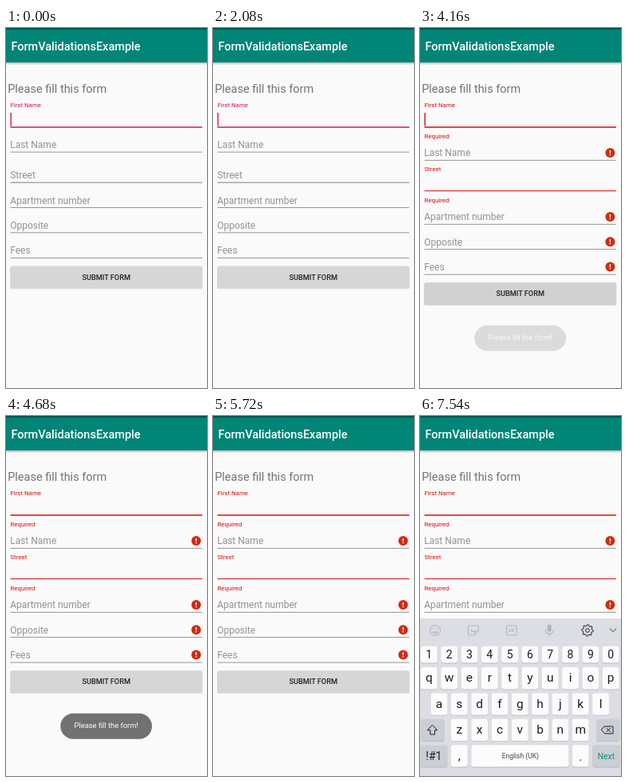
An HTML page that plays this animation: 252 by 450 pixels, repeating every 8 s.

```html
<!DOCTYPE html>
<html lang="en">
<head>
<meta charset="utf-8">
<title>Form validation</title>
<style>
  html, body { margin: 0; width: 100%; height: 100%; overflow: hidden; background: #fafafa; }
  svg { display: block; width: 100%; height: 100%; font-family: Roboto, sans-serif; }
</style>
</head>
<body>
<svg id="stage" viewBox="0 0 252 450"></svg>
<script>
const PINK = '#d0175c', RED = '#d50f0f', GREY = '#929292', ICON = '#b3b6ba';

const text = (x, y, s, size, fill, extra = '') =>
  `<text x="${x}" y="${y}" font-size="${size}" fill="${fill}" ${extra}>${s}</text>`;
const mid = (x, y, s, size, fill, extra = '') => text(x, y, s, size, fill, 'text-anchor="middle" ' + extra);
const rect = (x, y, w, h, fill, r = 0, extra = '') =>
  `<rect x="${x}" y="${y}" width="${w}" height="${h}" rx="${r}" fill="${fill}" ${extra}/>`;
const line = (y, color, h = 0.8) => rect(5.5, y - h / 2, 240.5, h, color);
const path = (d, color, w = 1) =>
  `<path d="${d}" fill="none" stroke="${color}" stroke-width="${w}" stroke-linecap="round" stroke-linejoin="round"/>`;
const group = (id, body) => `<g id="${id}">${body}</g>`;

const label = (y, s, color) => text(5.4, y, s, 7.9, color);
const field = (y, s, color = '#7d7d7d') => text(5.2, y, s, 12, GREY) + line(y + 4.9, color);
const alertIcon = y => `<circle cx="238.4" cy="${y}" r="6" fill="#d32a10"/>` +
  rect(237.7, y - 3.2, 1.4, 3.9, '#fff') + rect(237.7, y + 1.8, 1.4, 1.4, '#fff');
const button = (y, id, tint) =>
  rect(5, y + 0.8, 241.5, 28, '#000', 2, 'opacity=".12"') +
  rect(5.5, y, 240.5, 27.6, '#d6d6d6', 1.8) +
  group(id, tint) +
  mid(125.7, y + 17.2, 'SUBMIT FORM', 9.2, '#212121', 'font-weight="500"');

function header() {
  return rect(0, 0, 252, 450, '#fafafa') +
    [2.8, 1.8, 0.9].map(h => rect(0, 43, 252, h, '#000', 0, 'opacity=".09"')).join('') +
    rect(0, 0, 252, 43, '#008577') + rect(0, 0, 252, 2, '#00574b') +
    text(6.4, 28.4, 'FormValidationsExample', 14.5, '#fff', 'font-weight="500"') +
    text(2.2, 80.6, 'Please fill this form', 14.5, '#737373');
}

function cleanForm() {
  return label(99.2, 'First Name', PINK) + line(124, PINK, 1.5) +
    field(150.2, 'Last Name') + field(188.2, 'Street', '#5c5c5c') +
    field(219.6, 'Apartment number') + field(251, 'Opposite') + field(282.4, 'Fees') +
    button(297.4, 'press', rect(5.5, 297.4, 240.5, 27.6, '#c9c9c9', 1.8) +
      rect(116, 297.4, 109, 27.6, '#c5c5c5'));
}

function errorForm() {
  return label(99.2, 'First Name', RED) + line(124, '#e00b0b', 1.5) +
    label(138.2, 'Required', RED) + field(160.4, 'Last Name') +
    label(179, 'Street', RED) + line(203.6, RED, 1) +
    label(218.2, 'Required', RED) +
    field(240.4, 'Apartment number') + field(271.8, 'Opposite') + field(303.2, 'Fees') +
    [156, 236, 267.2, 298.4].map(alertIcon).join('') +
    button(318.2, 'release', rect(5.5, 318.2, 240.5, 27.6, '#d1d1d1', 1.8));
}

function toast() {
  return rect(68.3, 371.8, 114.7, 32, '#717171', 16) +
    text(85.6, 390, 'Please fill the form!', 9.35, '#fff');
}

function toolbar() {
  let gear = '';
  for (let i = 0; i <= 32; i++) {
    const a = i * Math.PI / 16, r = i % 4 < 2 ? 7.2 : 5.6;
    gear += `${i ? 'L' : 'M'}${210 + r * Math.cos(a)} ${268 + r * Math.sin(a)}`;
  }
  return path('M12.5 268a6.5 6.5 0 1 0 13 0a6.5 6.5 0 1 0-13 0M15.8 270q3.2 4 6.4 0zM16.8 265.8v.4M21.2 265.8v.4', ICON, 1.1) +
    path('M62 262h10q1.5 0 1.5 1.5v5l-5 5.5h-6.500q-1.500 0-1.500-1.500v-9q0-1.500 1.500-1.500zM73.500 268.500h-3.500q-1.500 0-1.500 1.500v4M64 267.500q1.500 3 4 1.500', ICON, 1.1) +
    rect(108.5, 262, 12.6, 12, 'none', 1.8, `stroke="${ICON}" stroke-width="1.1"`) +
    mid(114.8, 270, 'GIF', 5, ICON, 'font-weight="700"') +
    rect(159.6, 260.5, 5.2, 9, ICON, 2.6) +
    path('M157.200 267.500q0 4.800 5 4.800t5-4.800M162.200 272.500v2.600', ICON, 1.1) +
    path(gear, '#3c3e42', 1.1) +
    path('M207.700 268a2.300 2.300 0 1 0 4.600 0a2.300 2.300 0 1 0-4.600 0', '#3c3e42', 1.1) +
    path('M238.200 266l3.800 3.800l3.800-3.800', '#77797d', 1.1);
}

function keyboard() {
  const STEP = 25.32, WHITE = '#fcfcfd', DARK = '#cbced4', INK = '#1c1c1e';
  const key = (x, y, w, h, fill = WHITE) =>
    rect(x, y + 0.8, w, h, '#b6b9c0', 3) + rect(x, y, w, h, fill, 3);
  const row = (chars, x, y, h, size, drop) => [...chars].map((c, i) =>
    key(x + i * STEP - 10.4, y, 20.8, h) + mid(x + i * STEP, y + drop, c, size, INK)).join('');
  return rect(0, 253, 252, 197, '#dcdee3') + toolbar() +
    row('1234567890', 11.3, 287.8, 20.8, 14, 15.6) +
    row('qwertyuiop', 11.3, 314, 27.4, 15.5, 18.2) +
    row('asdfghjkl', 24, 346.4, 27.4, 15.5, 18.2) +
    row('zxcvbnm', 49.3, 378.8, 27.4, 15.5, 18.2) +
    key(0.9, 378.8, 29.6, 27.4, DARK) + key(221, 378.8, 29.6, 27.4, DARK) +
    path('M15.700 386.500l6 6.300h-3.200v5.200h-5.600v-5.200h-3.200z', INK) +
    path('M231.500 388h10.500v9h-10.500l-4-4.500zM234 390.300l4.400 4.400M238.400 390.300l-4.400 4.400', INK) +
    key(0.9, 411.2, 33.4, 27.4, DARK) + mid(17.4, 430, '!#1', 14, INK) +
    key(38.9, 411.2, 20.8, 27.4) + mid(49.3, 430, ',', 15.5, INK) +
    key(64.3, 411.2, 122.2, 27.4) + mid(125.8, 428.3, 'English (UK)', 8.5, '#48494c') +
    key(190.8, 411.2, 20.8, 27.4) + mid(201.2, 431, '.', 15.5, INK) +
    key(216.4, 411.2, 34.2, 27.4, DARK) + mid(233.4, 428.8, 'Next', 10.3, '#16877c');
}

const $ = id => document.getElementById(id);
$('stage').innerHTML = header() + group('clean', cleanForm()) + group('errors', errorForm()) +
  rect(5.5, 106, 1.4, 16.6, PINK, 0, 'id="caret"') +
  group('toast', toast()) + group('keys', keyboard());

const show = (id, on) => $(id).setAttribute('opacity', +on);
const blink = t => Math.floor((t < 5980 ? t : t - 5980) / 520) % 2 === 0;

function toastAlpha(t) {
  if (t < 4160 || t >= 5720) return 0;
  if (t < 4420) return 0.22;
  if (t < 4680) return 0.95;
  return t < 5460 ? 1 : 0.55;
}

function draw(now) {
  const t = now % 8000, failed = t >= 4160;
  show('clean', !failed);
  show('errors', failed);
  show('press', t >= 3900);
  show('release', t < 4420);
  show('caret', blink(t));
  $('caret').setAttribute('fill', failed ? RED : PINK);
  show('toast', toastAlpha(t));
  show('keys', t >= 7280);
  requestAnimationFrame(draw);
}
draw(0);
</script>
</body>
</html>
```
